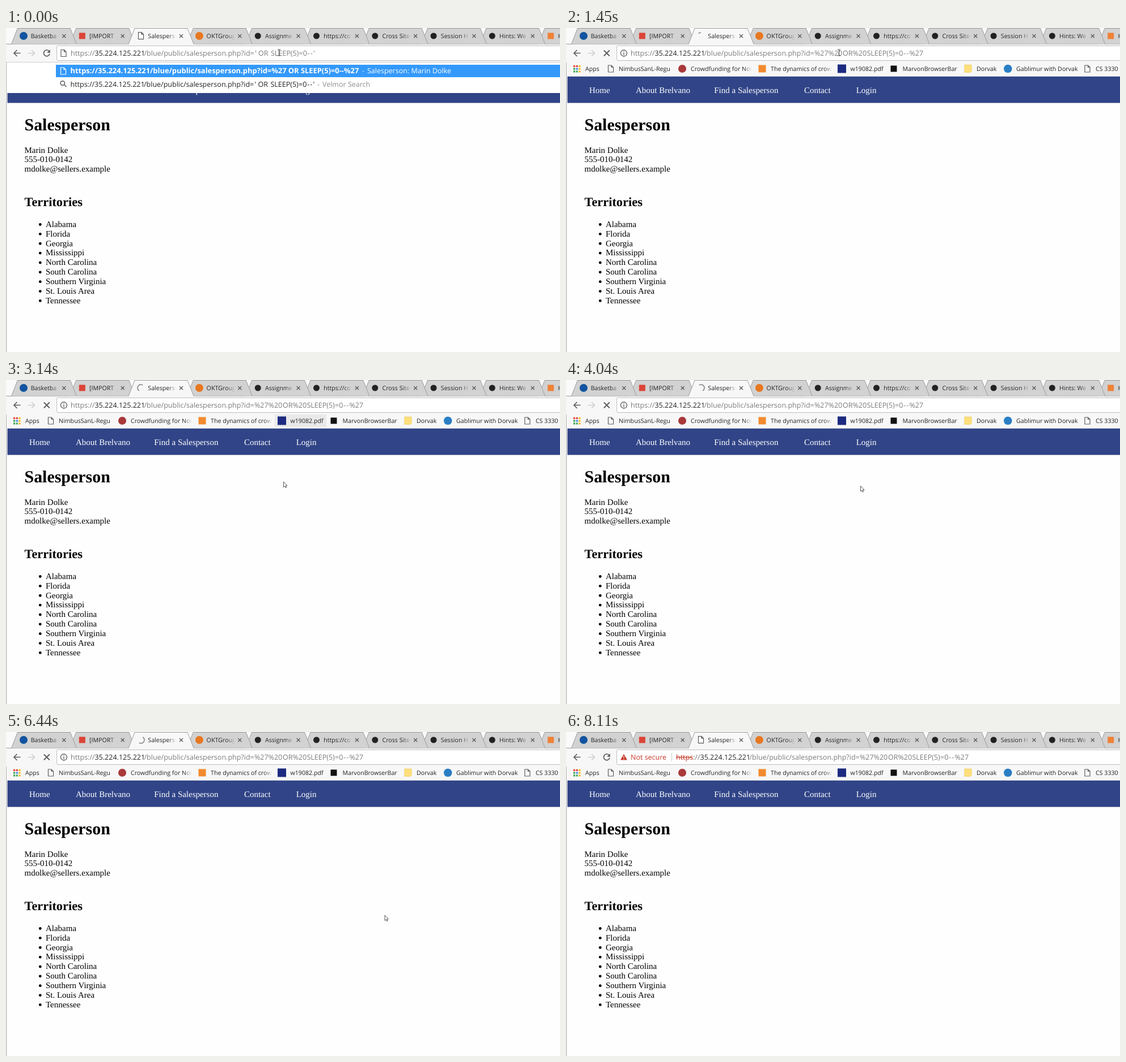
Animation of 977 by 573 pixels, one loop 8210 ms. Source, as an HTML page with a canvas:

```html
<!DOCTYPE html>
<html lang="en">
<head>
<meta charset="utf-8">
<title>Browser demo</title>
<style>
html, body { margin: 0; width: 100%; height: 100%; overflow: hidden; background: #fefefe; }
canvas { display: block; }
</style>
</head>
<body>
<canvas id="stage" width="977" height="573"></canvas>
<script>
const ctx = document.getElementById('stage').getContext('2d');
ctx.textRendering = 'geometricPrecision';
const LOOP = 8210, SUBMIT = 1450, LOADED = 6560, SPIN_START = 1280, SPIN_TURN = 1320;
const UI = '"Open Sans", "Noto Sans", sans-serif';
const SERIF = '"Liberation Serif", "Times New Roman", serif';
const SMALL = '10.65px ' + UI, URL_FONT = '12.5px ' + UI, BODY = '14.97px ' + SERIF;
const INK = '#222', GREY = '#7b7b7b', ICON = '#5a5a5a', RED = '#c53929', BAR = '#f7f7f7';

// The picture is refreshed in bursts: first time, last time, number of refreshes.
const bursts = [
  [0, 0, 1], [430, 1020, 2], [1450, 1700, 3], [1850, 1990, 2], [2115, 2240, 2], [2390, 2390, 1],
  [2540, 3260, 7], [3380, 3740, 4], [3890, 4040, 2], [4190, 4550, 4], [4690, 4810, 2],
  [4960, 4960, 1], [5100, 5470, 4], [5620, 5770, 2], [5910, 6290, 4], [6440, 6800, 4],
  [6950, 7200, 3], [7340, 7590, 3], [7730, 8110, 2]
];
const refreshes = bursts.flatMap(([from, to, n]) =>
  Array.from({ length: n }, (_, i) => from + (n > 1 ? (to - from) * i / (n - 1) : 0)));

// Pointer path: time, x, y of the tip.
const path = [
  [2540, 481, 43], [2780, 484, 76], [3140, 489, 179.5], [3260, 489, 180], [3740, 519, 187],
  [4040, 519, 187], [4550, 650, 305], [4690, 654, 305], [4960, 650.5, 306.5], [5470, 661, 313],
  [5620, 661, 313], [5770, 664, 319], [6290, 667.5, 323.5], [6440, 667.5, 323.5],
  [6800, 670, 326], [7200, 818, 418], [7340, 835, 440], [7590, 944, 571]
];

function pointerAt(t) {
  const next = path.findIndex(key => key[0] > t);
  if (next < 0) return path[path.length - 1].slice(1);
  const [t0, x0, y0] = path[next - 1], [t1, x1, y1] = path[next];
  const k = (t - t0) / (t1 - t0);
  return [x0 + (x1 - x0) * k, y0 + (y1 - y0) * k];
}

function rect(x, y, w, h, color) {
  ctx.fillStyle = color;
  ctx.fillRect(x, y, w, h);
}

function disc(x, y, r, color) {
  ctx.fillStyle = color;
  ctx.beginPath();
  ctx.arc(x, y, r, 0, 7);
  ctx.fill();
}

function square(x, y, r, color) { rect(x - r, y - r, 2 * r, 2 * r, color); }

function text(str, x, y, font, color) {
  ctx.font = font;
  ctx.fillStyle = color;
  ctx.fillText(str, x, y);
}

function fadedText(str, x, y, width) {
  const fade = ctx.createLinearGradient(x + width - 14, 0, x + width, 0);
  fade.addColorStop(0, INK);
  fade.addColorStop(1, 'rgba(34,34,34,0)');
  text(str, x, y, SMALL, fade);
}

// Draws SVG path data moved to x, y.
function shape(data, x, y, stroke, fill, width = 1) {
  const p = new Path2D(data);
  ctx.save();
  ctx.translate(x, y);
  ctx.lineWidth = width;
  if (fill) { ctx.fillStyle = fill; ctx.fill(p); }
  if (stroke) { ctx.strokeStyle = stroke; ctx.stroke(p); }
  ctx.restore();
}

function page(x, y, color, fill) {
  shape('M-4.5-6H1L4.5-2.5V6H-4.5Z M1-6V-2.5H4.5', x, y, color, fill, 1.2);
}

function url(x, y, encoded, schemeColor, hostColor, pathColor) {
  const put = (str, dx, color = pathColor) => text(str, x + dx, y, URL_FONT, color);
  if (schemeColor === RED) {
    put('https', 0, RED);
    put('://', 30);
    rect(x, y - 4.5, 29, 1.2, RED);
  } else put('https://', 0, schemeColor);
  put('35.224.125.221', 42.5, hostColor);
  put('/blue/public/salesperson.php?id=', 129.5);
  if (encoded) {
    put('%27%20', 324);
    put('OR', 374);
    put('%20', 391.5);
  } else put("' OR", 325);
  const call = encoded ? 416.5 : 353;
  put('SLEEP(5)', call);
  put('=0', call + 49.5);
  put('-', call + 64.8);
  put('-', call + 69.8);
  put(encoded ? '%27' : "'", call + 75);
}

const tabs = ['Basketba', '[IMPORT', 'Salespers', 'OKTGroup', 'Assignme', 'https://co',
  'Cross Site', 'Session H', 'Hints: We', 'He'];
const tabColors = ['#12549f', '#db4437', null, '#e87722', '#222', '#222', '#222', '#222', '#222', '#ef8236'];

function drawTab(i, t) {
  const x = 9.4 + 103.3 * i, active = i === 2;
  shape('M0 28.5L11 .5H104L115 28.5', x, 0, '#9c9c9c', active ? BAR : '#d2d2d2');
  if (active) rect(x + .5, 28, 114, 1.5, BAR);
  fadedText(tabs[i], x + 34.3, 18, 50);
  shape('M-3-3L3 3M3-3L-3 3', x + 93, 14.2, ICON, null, 1.3);
  if (!active) {
    const mark = i === 1 || i === 9 ? square : disc;
    mark(x + 21.6, 14, i === 0 || i === 3 ? 7 : 5.5, tabColors[i]);
  } else if (t < SUBMIT || t >= LOADED) page(238, 13.7, ICON, '#fff');
  else drawSpinner(t);
}

function drawSpinner(t) {
  const turn = 2 * Math.PI * (t - SPIN_START) / SPIN_TURN, top = -Math.PI / 2;
  ctx.strokeStyle = '#8c8c8c';
  ctx.lineWidth = 1.7;
  ctx.beginPath();
  ctx.arc(238, 14, 6, top - Math.max(0, turn - Math.PI), top - turn, true);
  ctx.stroke();
}

function drawToolbar(t) {
  const editing = t < SUBMIT, loading = !editing && t < LOADED;
  rect(0, 0, 977, 28, '#fafafa');
  rect(0, 28, 977, 33, BAR);
  rect(0, 28, 977, 1, '#9c9c9c');
  for (let i = tabs.length - 1; i >= 0; i--) if (i !== 2) drawTab(i, t);
  drawTab(2, t);

  shape('M6 0H-5M0-5.5L-5.5 0L0 5.5', 19.5, 44.5, ICON, null, 1.7);
  shape('M-6 0H5M0-5.5L5.5 0L0 5.5', 45, 44.5, '#cfcfcf', null, 1.7);
  if (loading) shape('M-5-5L5 5M5-5L-5 5', 71.8, 44.5, ICON, null, 1.8);
  else {
    shape('M4-3.8A5.4 5.4 0 1 0 5.3 1.3', 71.8, 44.5, ICON, null, 1.7);
    shape('M6-6.3V-.8H.5Z', 71.8, 44.5, null, ICON);
  }

  ctx.beginPath();
  ctx.roundRect(89.5, 31.5, 900, 26, 2);
  ctx.fillStyle = '#fff';
  ctx.fill();
  ctx.strokeStyle = '#bdbdbd';
  ctx.lineWidth = 1;
  ctx.stroke();

  if (editing) {
    page(101.5, 44.5, ICON);
    url(114, 49, false, GREY, INK, GREY);
    if (t >= 430 && t < 1020) rect(546, 34, 1, 18, '#000');
  } else if (loading) {
    shape('M5.5 0A5.5 5.5 0 1 1-5.5 0A5.5 5.5 0 1 1 5.5 0M0-.8V3.2M0-3.2V-1.8', 102, 44.5, ICON, null, 1.3);
    url(114, 49, true, GREY, INK, GREY);
  } else {
    shape('M0-5.5L6 5H-6Z', 102, 44.5, null, RED);
    shape('M0-2V1.5M0 2.5V4', 102, 44.5, '#fff', null, 1.2);
    text('Not secure', 114, 49, URL_FONT, RED);
    rect(186, 37, 1, 15, '#ccc');
    url(194, 49, true, RED, INK, GREY);
  }
}

function drawSuggestions() {
  rect(1, 60, 976, 55, '#fff');
  rect(88, 65, 889, 22, '#3399fb');
  page(101, 76, '#fff');
  text('https://35.224.125.221/blue/public/salesperson.php?id=%27 OR SLEEP(5)=0--%27',
    113.5, 80, 'bold 12.9px ' + UI, '#fff');
  text('-', 628, 80, URL_FONT, '#cfe6ff');
  text('Salesperson: Marin Dolke', 637, 80, URL_FONT, '#fff');
  shape('M3 0A3.7 3.7 0 1 1-4.4 0A3.7 3.7 0 1 1 3 0M2 2.7L6 6.5', 100.5, 97.5, ICON, null, 1.5);
  url(113.5, 103.7, false, INK, INK, INK);
  text('-', 549, 103.7, URL_FONT, '#8e8e8e');
  text('Velmor Search', 558, 103.7, URL_FONT, '#8e8e8e');
}

function drawBookmarks(t) {
  rect(1, 60, 976, 25.5, BAR);
  if (t >= 2660 && t < 3380) rect(474, 60, 91, 23, '#e9e9e9');
  ['#e8453c', '#e8453c', '#f9bb2d', '#3aa757', '#4688f1', '#f9bb2d', '#3aa757', '#3aa757', '#f9bb2d']
    .forEach((color, i) => rect(13 + i % 3 * 4.7, 66 + (i / 3 | 0) * 4.7, 3.2, 3.2, color));
  page(79, 72, ICON, '#fff');
  disc(205, 72, 7, '#a8393b');
  square(346, 72, 6.5, '#f28a2e');
  square(486.5, 72, 7.5, '#1c2a80');
  square(578, 72, 5.5, '#111');
  shape('M-6-6.5H6V4.5L4 6.5H-6Z', 709, 71.8, '#eccb62', '#ffe07d');
  disc(779.3, 72, 7.3, '#2b7fc4');
  page(919.5, 72, ICON, '#fff');
  [['Apps', 34], ['NimbusSanL-Regu', 93], ['w19082.pdf', 501.5], ['MarvonBrowserBar', 593.5],
    ['Dorvak', 724], ['Gablimur with Dorvak', 794], ['CS 3330', 934]]
    .forEach(([label, x]) => text(label, x, 76, SMALL, INK));
  fadedText('Crowdfunding for Non', 220, 76, 108);
  fadedText('The dynamics of crowd', 361, 76, 108);
}

function drawPage() {
  rect(0, 60, 977, 513, '#fefefe');
  rect(0, 60, 1.3, 513, '#b4b4b4');
  rect(2.5, 85.5, 975, 47, '#304487');
  [['Home', 41], ['About Brelvano', 123], ['Find a Salesperson', 261.3], ['Contact', 420], ['Login', 511.7]]
    .forEach(([label, x]) => text(label, x, 115.3, BODY, '#fff'));
  text('Salesperson', 32.5, 180.7, 'bold 29.95px ' + SERIF, '#000');
  ['Marin Dolke', '555-010-0142', 'mdolke@sellers.example']
    .forEach((line, i) => text(line, 32.5, 220.5 + 16.9 * i, BODY, '#000'));
  text('Territories', 32.5, 314.5, 'bold 22.4px ' + SERIF, '#000');
  ['Alabama', 'Florida', 'Georgia', 'Mississippi', 'North Carolina', 'South Carolina',
    'Southern Virginia', 'St. Louis Area', 'Tennessee'].forEach((state, i) => {
    const y = 351.8 + 16.87 * i;
    disc(60.3, y - 4.3, 2.4, '#000');
    text(state, 70, y, BODY, '#000');
  });
}

function drawPointer(t) {
  if (t < 2660) {
    shape('M-2.5-5.5H-.5L0-5L.5-5.5H2.5M0-5V5M-2.5 5.5H-.5L0 5L.5 5.5H2.5', 481.5, 43.5, '#333');
  } else if (t < 7730) {
    shape('M.5.5V10L2.7 8L4.2 11.2L5.6 10.5L4.2 7.4H7Z', ...pointerAt(t), '#444', '#fff', .9);
  }
}

function draw(t) {
  drawPage();
  if (t < SUBMIT) drawSuggestions(); else drawBookmarks(t);
  drawToolbar(t);
  if (t < SUBMIT) rect(0, 60, 977, 1, '#cfcfcf');
  drawPointer(t);
}

function tick() {
  const now = performance.now() % LOOP;
  draw(refreshes.findLast(time => time <= now));
  requestAnimationFrame(tick);
}
tick();
</script>
</body>
</html>
```
